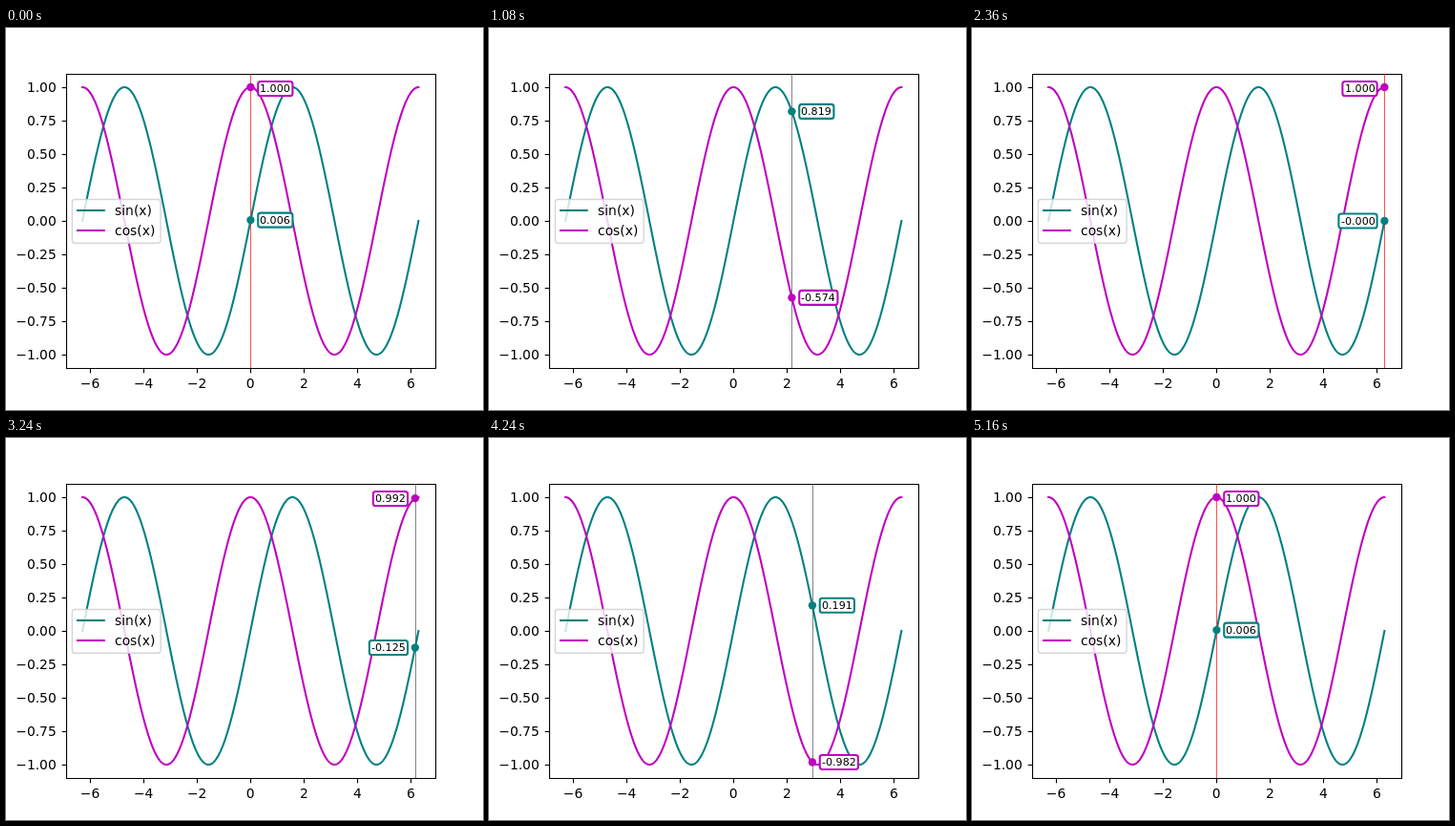
Write an HTML page with a canvas that moves like this. It is 500 by 400 pixels and loops after 5200 ms.

```html
<!DOCTYPE html>
<html lang="en">
<head>
<meta charset="utf-8">
<title>Sine and cosine cursor</title>
<style>
  html, body { margin: 0; width: 100%; height: 100%; overflow: hidden; background: #fff; }
  canvas { display: block; }
</style>
</head>
<body>
<canvas id="stage" width="500" height="400"></canvas>
<script>
const ctx = document.getElementById('stage').getContext('2d');
const PT = 100 / 72; // pixels per point
const AXES = { left: 62.5, right: 450, top: 48, bottom: 356 };
const LOOP = 5200, TICK = 40, STEPS = 49, SAMPLES = 1000;
const SERIES = [
  { name: 'sin(x)', fn: Math.sin, color: '#008080' },
  { name: 'cos(x)', fn: Math.cos, color: '#bf00bf' },
];

const clamp = (v, lo, hi) => Math.min(hi, Math.max(lo, v));
const toX = x => 256.25 + x * 387.5 / (4.4 * Math.PI);
const toY = y => 202 - y * 140;
const snap = v => Math.floor(v + 0.5) + 0.5;
const sampleX = i => -2 * Math.PI + i * 4 * Math.PI / (SAMPLES - 1);

function line(x1, y1, x2, y2, color, width) {
  ctx.strokeStyle = color;
  ctx.lineWidth = width;
  ctx.beginPath();
  ctx.moveTo(x1, y1);
  ctx.lineTo(x2, y2);
  ctx.stroke();
}

function text(str, x, y, points, align = 'left') {
  ctx.font = `${points * PT}px "DejaVu Sans", sans-serif`;
  ctx.textAlign = align;
  ctx.fillStyle = '#000';
  ctx.fillText(str, x, y);
}

function roundBox(x, y, w, h, radius, fill, stroke, width) {
  ctx.beginPath();
  ctx.roundRect(x, y, w, h, radius);
  ctx.fillStyle = fill;
  ctx.fill();
  ctx.strokeStyle = stroke;
  ctx.lineWidth = width;
  ctx.stroke();
}

function drawCurve({ fn, color }) {
  ctx.strokeStyle = color;
  ctx.lineWidth = 1.5 * PT;
  ctx.lineJoin = 'round';
  ctx.lineCap = 'square';
  ctx.beginPath();
  for (let i = 0; i < SAMPLES; i++) {
    const x = sampleX(i);
    ctx.lineTo(toX(x), toY(fn(x)));
  }
  ctx.stroke();
  ctx.lineCap = 'butt';
}

function drawAxes() {
  const { left, right, top, bottom } = AXES;
  const width = 0.8 * PT, tick = 3.5 * PT;
  const signed = (v, digits) => v.toFixed(digits).replace('-', '\u2212');
  for (let v = -6; v <= 6; v += 2) {
    const x = snap(toX(v));
    line(x, bottom + 0.5, x, bottom + 0.5 + tick, '#000', width);
    text(signed(v, 0), toX(v), 377, 10, 'center');
  }
  for (let v = -1; v <= 1; v += 0.25) {
    const y = snap(toY(v));
    line(snap(left) - tick, y, snap(left), y, '#000', width);
    text(signed(v, 2), left - 2 * tick, toY(v) + 5, 10, 'right');
  }
  ctx.strokeStyle = '#000';
  ctx.lineWidth = width;
  ctx.strokeRect(snap(left), snap(top), snap(right) - snap(left), bottom - top);
}

function drawLegend() {
  roundBox(69.4, 179.5, 92.7, 45.8, 2.8, 'rgba(255,255,255,.8)', 'rgba(204,204,204,.8)', PT);
  SERIES.forEach(({ name, color }, i) => {
    const y = 191 + i * 21;
    line(74, y, 103.8, y, color, 1.5 * PT);
    text(name, 114, y + 5, 10);
  });
}

// Label centres stay inside the axes and keep a minimum distance.
function labelCentres(values) {
  const ys = values.map(v => clamp(toY(v), 63.5, 340.5));
  const mean = (ys[0] + ys[1]) / 2, gap = 18;
  if (Math.abs(ys[0] - ys[1]) >= gap) return ys;
  const side = ys[0] <= ys[1] ? 1 : -1;
  return [mean - side * gap / 2, mean + side * gap / 2];
}

function drawLabel(value, px, cy, color, flipped) {
  const str = value.toFixed(3), pad = 2.2, height = 15;
  ctx.font = `${8 * PT}px "DejaVu Sans", sans-serif`;
  const w = ctx.measureText(str).width;
  const x = flipped ? px - 10 - w : px + 10;
  roundBox(x - pad, cy - height / 2, w + 2 * pad, height, 2.6, '#fff', color, 1.5 * PT);
  text(str, Math.round(x), Math.round(cy + 3.6), 8);
}

function drawCursor(step) {
  const x = sampleX(Math.round((SAMPLES - 1) / 2 * (1 + step / STEPS)));
  const px = toX(x), lineX = snap(px);
  const values = SERIES.map(s => s.fn(x));
  const centres = labelCentres(values);
  // The hairline is red on even pixel columns and grey on odd ones.
  const color = Math.floor(lineX) % 2 ? '#4c4c4c' : '#f00';
  line(lineX, AXES.top, lineX, AXES.bottom, color, 0.5 * PT);
  SERIES.forEach((s, i) => {
    ctx.fillStyle = s.color;
    ctx.beginPath();
    ctx.arc(px, toY(values[i]), 3 * PT, 0, 2 * Math.PI);
    ctx.fill();
  });
  SERIES.forEach((s, i) => drawLabel(values[i], px, centres[i], s.color, step >= 40));
}

function stepAt(time) {
  const ticksSince = start => clamp(Math.floor((time - start) / TICK), 0, STEPS);
  return ticksSince(400) - ticksSince(3200);
}

function draw() {
  ctx.fillStyle = '#fff';
  ctx.fillRect(0, 0, 500, 400);
  SERIES.forEach(drawCurve);
  drawAxes();
  drawLegend();
  drawCursor(stepAt(performance.now() % LOOP));
  requestAnimationFrame(draw);
}
draw();
</script>
</body>
</html>
```
